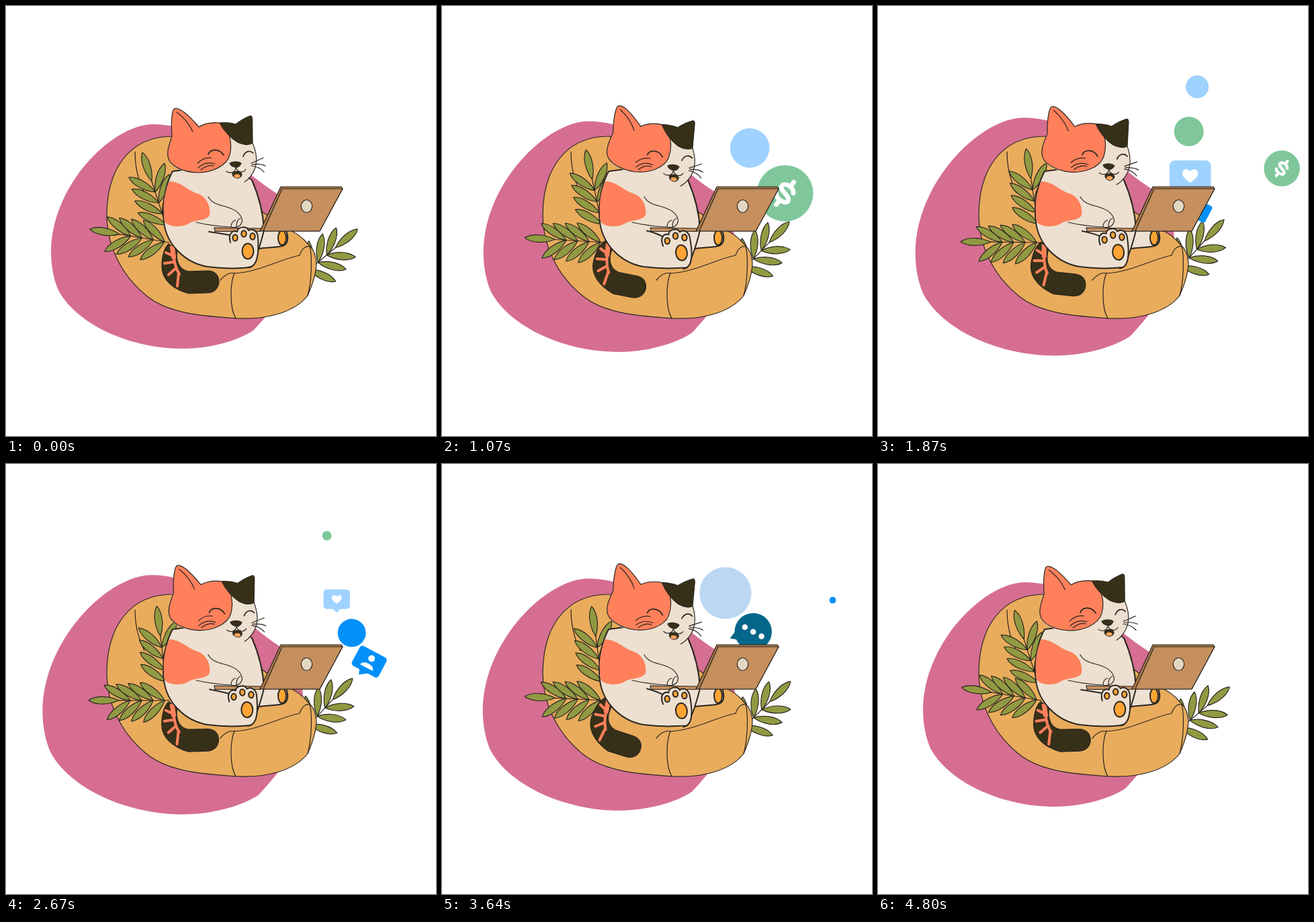
Write an HTML page that moves like this. It is 640x640 px and loops after 4830 ms.

```html
<!DOCTYPE html>
<html lang="en">
<head>
<meta charset="utf-8">
<title>Cat with laptop</title>
<style>
  html, body { margin: 0; width: 100%; height: 100%; overflow: hidden; background: #fff; }
  svg { display: block; width: 100vw; height: 100vh; }
  .ink { fill: none; stroke: #2b2622; stroke-width: 1.2; stroke-linecap: round; stroke-linejoin: round; }
  .bold { stroke-width: 2; }
  .cream { fill: #ede0d0; }
  .orange { fill: #ff805b; }
  .dark { fill: #373018; }
  .bag { fill: #e9ac5c; }
  .wood { fill: #c58f5e; }
  .edge { fill: #a97849; }
  .pad { fill: #ffa434; }
  .leaf { fill: #919a42; }
  .white { fill: #fff; }
</style>
</head>
<body>
<svg viewBox="0 0 640 640" xmlns="http://www.w3.org/2000/svg">
  <path id="blob" fill="#d66e92" d="M218 176C158 177 68 266 67 365C67 387 71 407 78 423C105 474 185 510 262 510C305 510 345 498 368 483C378 473 390 458 405 440C440 390 440 305 400 277C370 258 340 230 310 205C280 186 250 176 218 176Z"/>
  <g id="rightPlant"></g>

  <path class="ink bag" d="M250 194C182 193 150 245 150 312C151 365 178 408 214 435C247 459 300 462 345 465C395 467 432 453 449 431C456 415 462 395 462 382C461 370 457 361 451 356C442 345 432 337 420 333L300 250Z"/>
  <path class="ink" d="M192 217C192 238 196 258 206 278M342 465C333 450 333 415 340 397M319 408C326 400 332 396 340 398C376 396 405 378 437 371C440 362 446 356 452 358C456 372 455 410 449 431"/>

  <g id="upperPlant"></g>
  <g id="lowerPlant"></g>

  <g id="tail">
    <path class="ink dark" d="M255 362C252 380 258 393 272 395L300 394C312 394 317 402 317 411C316 422 308 427 298 427L272 428C250 422 232 408 232 388C232 375 234 362 242 354Z"/>
    <path fill="none" stroke="#ff805b" stroke-width="4" stroke-linecap="round" d="M249 360C249 377 252 390 258 399M249 372L238 367M249 381L236 383M253 390L242 400M257 397L255 417"/>
    <path stroke="#ff805b" stroke-width="7" d="M247 357L250 376"/>
  </g>

  <path class="ink bold cream" d="M376 333L417 334C421 346 420 354 412 357C400 360 388 359 372 362Z"/>
  <ellipse class="ink bold pad" cx="411" cy="345" rx="6" ry="11"/>

  <path class="ink bold cream" d="M248 246C236 268 232 298 235 322C239 354 265 382 300 388C322 391 345 391 364 389C373 375 380 350 384 334C383 308 376 282 366 259L330 235Z"/>
  <path class="orange" d="M243 261C260 261 272 276 285 279C299 284 305 299 303 311C298 321 281 317 270 325C260 330 241 329 236 321C233 300 235 278 243 261Z"/>

  <g id="bubbles"></g>

  <path class="ink wood" d="M310 330L381 331L379 335.500L311 335.500Z"/>
  <path class="cream" d="M328 300L336 302C347 306 353 316 351 322C348 330 340 330 335 329L322 326Z"/>
  <path class="ink" d="M301 284C309 298 325 296 336 302C347 306 353 316 351 322C348 330 340 330 335 329C318 328 300 326 283 322M335 329C335 323 338 319 342 319M343 329C343 322 345 317 349 316"/>
  <path class="ink edge" d="M378 335L409 269L499 269L501 272L467 335Z"/>
  <path class="ink wood" d="M383 335L411 272L501 272L467 335Z"/>
  <ellipse class="ink" style="fill:#e3d6c3" cx="447.500" cy="298" rx="8.200" ry="9.500"/>

  <path id="leg" class="ink bold"/>
  <g id="foot">
    <path class="cream" d="M333 352C330 338 338 333 344 336C345 328 358 327 361 334C368 330 375 336 375 345C376 360 375 380 366 387L345 385L330 365Z"/>
    <path class="ink bold" d="M334 352C330 338 338 333 344 336C345 328 358 327 361 334C368 330 375 336 375 345C376 360 376 379 368 386C366 388 364 389 360 389"/>
    <g class="ink bold">
      <ellipse class="pad" cx="341" cy="345" rx="3.700" ry="4.700"/>
      <ellipse class="pad" cx="354" cy="339" rx="3.700" ry="4.700"/>
      <ellipse class="pad" cx="367" cy="343" rx="3.700" ry="4.700"/>
      <ellipse class="pad" cx="360" cy="365" rx="8.500" ry="11.500"/>
    </g>
  </g>

  <g id="head">
    <path class="cream" d="M247 192L287 181C302 172 325 171 342 175L367 204C375 222 374 238 367 249C361 258 353 263 342 265L285 249C262 248 243 240 241 224C239 212 244 201 247 192Z"/>
    <path class="ink orange" d="M247 193C245 175 247 160 249 155C251 150 258 153 265 158C275 166 282 174 287 180C297 174 308 173 318 174C331 181 338 202 333 222C328 239 305 248 285 248C262 247 243 238 241 224C239 212 245 202 247 193Z"/>
    <path class="ink dark" d="M318 174C328 173 335 174 342 176C348 171 355 167 362 164Q366 162 366.500 168L367 204C361 208 352 206 345 203C335 197 325 187 318 174Z"/>
    <path class="ink" d="M367 204C375 222 374 238 367 249C364 254 360 259 355 262M254 158C266 167 273 176 278 187"/>
    <path class="ink" style="stroke-width:1.700" d="M301 221C304 212 318 212 324 222M353 224C356 216 363 214 368 219"/>
    <path class="ink" d="M285 234C291 228 298 225 306 226M286 241C293 234 301 232 311 235M290 244C297 238 303 236 309 238M365 234L383 226M366 236C374 235 381 235 386 238M365 238C374 239 380 242 384 247M328 246C333 250 341 248 342 241C346 248 353 249 357 243"/>
    <path class="ink dark" d="M333 234C338 231 346 231 350 234C348 239 344 241 341 240C337 239 334 237 333 234Z"/>
    <path class="ink dark" d="M337 249C341 245 348 245 351 250C351 254 347 257 343 256C339 255 337 252 337 249Z"/>
    <ellipse cx="344" cy="253" rx="4.500" ry="2.800" fill="#ffa35a"/>
  </g>
</svg>
<script>
const LOOP = 4830, LIFE = 2130;
const { sin, cos, PI } = Math;
const $ = id => document.getElementById(id);
const set = (id, value) => $(id).setAttribute('transform', value);

// A straight stem with leaves in pairs and one more at its end.
function plant(id, { x, y, heading, pairs, length = 45, gap = 17, left, right, fan = 2 }) {
  const leaf = (at, angle) => `<path class="ink leaf" transform="translate(${at}) rotate(${angle})"
    d="M0 0C${length * .3} -6.500 ${length * .75} -8 ${length} 0C${length * .75} 8 ${length * .3} 6.500 0 0Z"/>`;
  let art = `<path class="ink" d="M0 0H${pairs * gap + 8}"/>`;
  for (let i = 0; i < pairs; i++) {
    const at = 7 + (pairs - 1 - i) * gap;
    art += leaf(at, -left - fan * i) + leaf(at, right + fan * i);
  }
  art += leaf(7 + pairs * gap, 0);
  $(id).innerHTML = `<g transform="translate(${x} ${y}) rotate(${heading})">${art}</g>`;
}

plant('rightPlant', { x: 446, y: 397, heading: -40, pairs: 3, length: 43, left: 31, right: 44, fan: 10 });
plant('upperPlant', { x: 240, y: 332, heading: -108, pairs: 4, left: 43, right: 36 });
plant('lowerPlant', { x: 243, y: 352, heading: 180, pairs: 4, left: 40, right: 30 });

const disc = (r, color) => `<circle r="${r}" fill="${color}"/>`;
const money = disc(43.5, '#7fc79b') + `<path transform="rotate(38)" fill="none" stroke="#fff" stroke-width="7"
  stroke-linecap="round" d="M10 -8C5 -16 -11 -14 -11 -6C-11 2 11 -2 11 7C11 14 -6 15 -10 9M0 -14V-22M0 14V22"/>`;
const like = `<rect x="-32" y="-23.5" width="64" height="47" rx="8" fill="#9fd2ff"/>
  <path fill="#9fd2ff" d="M-10 23H10L0 33Z"/>
  <path class="white" d="M0 11C-7 6 -12 2 -12 -4C-12 -11 -3 -12 0 -6C3 -12 12 -11 12 -4C12 2 7 6 0 11Z"/>`;
const friend = `<g transform="rotate(28)"><rect x="-25" y="-18.5" width="50" height="37" rx="5" fill="#0290f8"/>
  <path fill="#0290f8" d="M-9 18L-5 27L7 18Z"/><circle class="white" cx="1" cy="-6.5" r="5.5"/>
  <path class="white" d="M-11 11C-11 1 12 1 12 11Z"/></g>`;
const chat = disc(28, '#04668a') + '<path fill="#04668a" d="M-35 10L-25 -3L-17 13Z"/>'
  + [-1, 0, 1].map(i => `<circle class="white" cx="${12.5 * i}" cy="${7 * i}" r="4.300"/>`).join('');

const bubbles = [];

// A bubble drifts by (dx, dy) to either side of (x, y), swelling and shrinking.
function bubble(art, start, x, y, dx, dy) {
  const node = document.createElementNS('http://www.w3.org/2000/svg', 'g');
  node.innerHTML = art;
  $('bubbles').append(node);
  bubbles.push(t => {
    const life = (t - start) / LIFE, on = life > 0 && life < 1;
    node.style.display = on ? '' : 'none';
    if (!on) return;
    const e = sin(.75 * PI * (life - .43));
    node.setAttribute('transform', `translate(${x + dx * e} ${y + dy * e}) scale(${sin(PI * life)})`);
  });
}

bubble(disc(30, '#9fd2ff'), 150, 458, 212, 22, -118);
bubble(money, 190, 515, 277, 115, -47);
bubble(disc(22, '#7fc79b'), 760, 458, 212, 22, -118);
bubble(like, 990, 466, 250, 35, -65);
bubble(friend, 1300, 504, 299, 76, -10);
bubble(disc(21, '#0290f8'), 1670, 507, 257, 81, -59);
bubble(disc(39, '#bcd7f2'), 2670, 423, 197, -18, -80);
bubble(chat, 2670, 462, 253, 19, -55);

// From 0 up to 1 at the peak and back, along two quarter sines.
const swing = (p, peak = .5) => sin(PI / 2 * (p < peak ? p / peak : (1 - p) / (1 - peak)));

// Two flicks, the first one smaller.
const flick = p => p < .55 ? .7 * swing(p / .55, .25) : swing((p - .55) / .45, .45);

function draw(t) {
  const p = t / LOOP;
  const nod = swing(2 * p % 1);
  const size = 1 + .0345 * (1 - cos(2 * PI * p));

  set('blob', `translate(255 338) scale(${size}) translate(-255 -338)`);
  set('head', `rotate(${6 * nod} 298 265)`);
  set('foot', `rotate(${-6.7 * nod} 378 397)`);
  $('leg').setAttribute('d', `M${302 + 3 * nod} ${336 - 1.5 * nod}Q${318 + nod} 338 ${333 - 4 * nod} ${341 + 2.5 * nod}`);
  set('tail', `rotate(${20 * flick(p)} 262 356)`);
  set('upperPlant', `rotate(${11.5 * swing(p, .65)} 246 325)`);
  set('lowerPlant', `rotate(${9.5 * (1 - swing(p))} 243 351)`);
  set('rightPlant', `rotate(${-7.6 * swing(p, .39)} 413 388)`);
  bubbles.forEach(move => move(t));
}

const begin = performance.now();
function tick() {
  draw((performance.now() - begin) % LOOP);
  requestAnimationFrame(tick);
}
tick();
</script>
</body>
</html>
```
